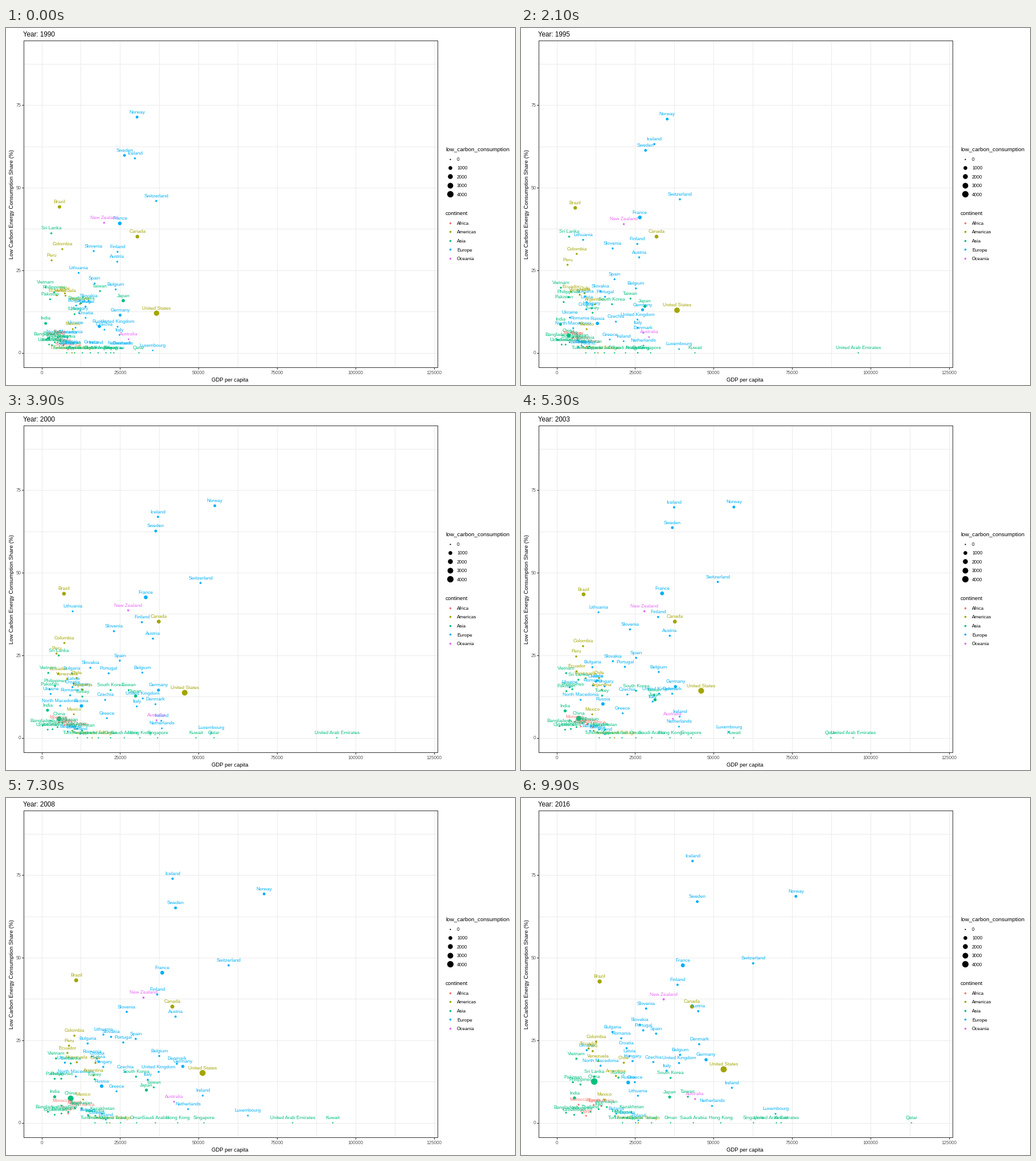
These frames come from a looping animation (894x626 px, 10 s). A matplotlib script:

```python
import numpy as np
import matplotlib.pyplot as plt
from matplotlib.animation import FuncAnimation
from matplotlib.patches import Rectangle

W, H, DPI = 894, 626, 64
PX = 72 / DPI                      # points per pixel
FRAMES, INTERVAL = 100, 100
LEFT, RIGHT, TOP, BOTTOM = 30.5, 757.5, 21.5, 594.5
GDP_MAX = 120                      # thousands; richer countries are dropped

plt.rcParams["font.family"] = "Liberation Sans"
plt.rcParams["text.hinting"] = "default"
rng = np.random.default_rng(7)
fig = plt.figure(figsize=(W / DPI, H / DPI), dpi=DPI, facecolor="white")
ax = fig.add_axes([0, 0, 1, 1])
ax.set_xlim(0, W)
ax.set_ylim(H, 0)
ax.axis("off")


def px(gdp):
    return 62.5 + 5.516 * gdp


def py(share):
    return 569.5 - 5.788 * share


def diameter(twh):
    return 2.2 + 9 * np.sqrt(twh / 4000)


def line(x1, y1, x2, y2, color):
    ax.plot([x1, x2], [y1, y2], color=color, lw=PX, antialiased=False,
            solid_capstyle="butt", zorder=1)


def text(x, y, s, size, color="black", **kw):
    kw = {"ha": "left", "va": "baseline", "zorder": 5} | kw
    return ax.text(x, y, s, fontsize=size * PX, color=color, **kw)


def dots(x, y, d, color):
    return ax.scatter(x, y, s=(np.asarray(d) * PX) ** 2, c=color,
                      linewidths=0, zorder=3)


# Panel, grid and axes
for gdp in np.arange(0, 126, 12.5):
    line(px(gdp), TOP, px(gdp), BOTTOM, "#EBEBEB")
for share in np.arange(0, 90, 12.5):
    line(LEFT, py(share), RIGHT, py(share), "#EBEBEB")
for gdp in range(0, 126, 25):
    line(px(gdp), BOTTOM, px(gdp), BOTTOM + 3, "#333333")
    text(px(gdp), 607, str(gdp * 1000), 8, "#4D4D4D", ha="center")
for share in range(0, 76, 25):
    line(LEFT - 3, py(share), LEFT, py(share), "#333333")
    text(26.5, py(share) + 3, str(share), 8, "#4D4D4D", ha="right")
panel = Rectangle((LEFT, TOP), RIGHT - LEFT, BOTTOM - TOP, fill=False,
                  ec="#333333", lw=PX, antialiased=False, zorder=6)
ax.add_patch(panel)
text(393, 620, "GDP per capita", 9.5, ha="center")
text(11, 309, "Low Carbon Energy Consumption Share (%)", 9.8,
     ha="center", va="center", rotation=90)
title = text(30, 15, "", 11.7)

# Legends
COLORS = {"Africa": "#F8766D", "Americas": "#A3A500", "Asia": "#00BF7D",
          "Europe": "#00B0F6", "Oceania": "#E76BF3"}
text(772, 216, "low_carbon_consumption", 9.9)
text(772, 328, "continent", 9.7)
for i, (name, color) in enumerate(COLORS.items()):
    y = 229.5 + 15.4 * i
    dots([780], [y], [diameter(1000 * i)], "black")
    text(792, y + 3.5, str(1000 * i), 8.2)
    y = 341.5 + 15.5 * i
    dots([780], [y], [3.6], color)
    text(792, y + 3.5, name, 8.2)

# Low carbon consumption in TWh, first and last year
MAJOR = {"United States": (2500, 3700), "China": (350, 4200),
         "Brazil": (700, 1300), "Canada": (900, 1200), "France": (900, 1100),
         "Russia": (600, 900), "Japan": (650, 400), "Germany": (400, 600),
         "India": (350, 550), "Norway": (350, 380), "Sweden": (350, 370)}
countries = []


def add(continent, name, gdp, share, growth, slump=0):
    label = text(0, 0, name, 8.4, COLORS[continent], ha="center", clip_on=True)
    label.set_clip_path(panel)
    twh = MAJOR.get(name, (12 * share[0] ** 0.5, 25 * share[-1] ** 0.5))
    countries.append((label, gdp, share, twh, growth, slump))


def along(values, s):
    """Evenly spaced key values, joined by straight lines."""
    return np.interp(s, np.linspace(0, 1, len(values)), values)


def steady(s):
    return s


def boom(s):
    """Slow start, a jump before 2000, then a level stretch."""
    return np.interp(s, (0, 0.21, 0.39, 0.53, 0.73, 1), (0, 0.1, 0.54, 0.56, 0.88, 1))


def group(continent, growth=steady, slump=0, **ends):
    """Each country: first GDP and share, last GDP and share."""
    for name, (g0, s0, g1, s1) in ends.items():
        add(continent, name.replace("_", " "), (g0, g1), (s0, s1), growth, slump)


def ladder(continent, names, first, last, shares=(0, 0), slump=0):
    """Countries near the bottom, one step of GDP apart."""
    for name, g0, g1 in zip(names, first, last):
        add(continent, name, (g0, g1), rng.uniform(*shares, 2), steady, slump)


steps = np.arange(10)
group("Europe", boom,
      Norway=(30.4, 71.4, 76.2, 68.6), Sweden=(26.4, 59.8, 44.8, 67),
      Iceland=(29.7, 58.9, 43.3, 79.3), Switzerland=(36.5, 46, 62.6, 48.3),
      France=(24.9, 39.2, 40.2, 47.7), Finland=(24.2, 30.6, 38.5, 41.8),
      Austria=(24.1, 27.6, 45.1, 33.8), Germany=(25, 11.4, 47.6, 19.1),
      United_Kingdom=(24.2, 7.9, 39, 18.1), Belgium=(23.6, 19.2, 39.3, 20.6),
      Spain=(16.9, 21, 31.7, 27), Italy=(24.8, 5.4, 35, 15.8),
      Denmark=(25.5, 1.3, 45.4, 23.8), Ireland=(17.3, 1.6, 55.8, 10.6),
      Netherlands=(25.1, 1.4, 49.5, 5.1), Luxembourg=(35.4, 0.7, 69.7, 2.7),
      Portugal=(14, 14, 27.6, 28), Greece=(16, 1.8, 24.9, 12.3),
      Slovenia=(16.6, 30.8, 28.5, 34.6))
group("Europe", slump=7,
      Slovakia=(15, 15.7, 26.5, 29.7), Bulgaria=(11, 14.3, 17.8, 27.5),
      Hungary=(12, 12, 24.2, 18.7), Czechia=(20, 7, 30.8, 18.4),
      Romania=(8.2, 4.6, 20.6, 25.6), North_Macedonia=(7.3, 4.8, 14, 17.3))
group("Europe", slump=13,
      Russia=(18.4, 8, 22.8, 12.2), Ukraine=(10.8, 7.6, 9.6, 22),
      Latvia=(14, 14, 23.2, 20.2), Croatia=(14, 10.6, 22.3, 22.6))
group("Oceania", boom,
      Australia=(27.7, 4.1, 44.1, 7.2), New_Zealand=(19.9, 39.4, 34.1, 37.4))
group("Americas", boom,
      Canada=(30.5, 35.2, 43.1, 35.2), United_States=(36.6, 12, 53.2, 16.2))
group("Americas", slump=3,
      Brazil=(5.7, 44.2, 13.7, 42.8), Colombia=(6.6, 31.4, 12.6, 24.6),
      Peru=(3.2, 28, 11.5, 21.7), Chile=(7.4, 18, 21.4, 18.2),
      Ecuador=(4.9, 17.4, 10.2, 22.5), Venezuela=(7.6, 17.3, 13.3, 18.7),
      Argentina=(12.2, 14.8, 18.9, 14.2), Mexico=(9.9, 7.2, 15.2, 7))
group("Asia",
      Japan=(26, 15.8, 36, 7.8), South_Korea=(12.6, 15, 36.3, 13.6),
      Taiwan=(18.6, 18.7, 41.8, 7.9))
group("Asia", slump=2,
      Vietnam=(1.3, 19.8, 6.3, 19.4), Philippines=(4, 18.3, 7.6, 11.6),
      Pakistan=(2.7, 16.2, 5.2, 12.3), Turkey=(10.5, 11.7, 19.7, 13.7),
      India=(1.3, 8.9, 5.7, 7.5))

# Countries with a sharp turn
add("Europe", "Lithuania", (11.8, 25.9), (24.2, 36, 40, 26, 8.2), steady, 13)
add("Asia", "Sri Lanka", (3.1, 12), (36.2, 35, 17.5, 18, 14), steady, 2)
add("Asia", "China", (2.3, 12), (4.4, 5.7, 6, 12.5), steady, 1)
add("Asia", "Kuwait", (22, 48, 50, 95, 71.5), (0, 0), steady)
add("Asia", "Qatar", (31, 25, 77, 150, 113), (0, 0), steady)
add("Asia", "United Arab Emirates", (130, 90, 97, 79, 70), (0, 0), steady)

ladder("Africa", ["Morocco", "Egypt", "Algeria", "South Africa"],
       4.5 + 1.3 * steps, 7 + 2.4 * steps, (1, 6))
ladder("Asia", ["Bangladesh", "Uzbekistan", "Indonesia", "Thailand", "Iraq",
                "Azerbaijan", "Iran", "Malaysia", "Kazakhstan"],
       1.5 + 0.9 * steps, 3 + 2.6 * steps, (1.5, 4.8), 3)
ladder("Europe", ["Belarus", "Estonia", "Poland"],
       8 + steps, 19 + 3.5 * steps, (0, 3), 7)
ladder("Americas", ["Trinidad and Tobago"], [9.7], [26])
ladder("Asia", ["Turkmenistan", "Cyprus", "Israel", "Oman", "Saudi Arabia",
                "Hong Kong", "Singapore"],
       8 + 2.5 * steps, 21 * 1.2 ** steps, slump=3)

labels = [c[0] for c in countries]
n = len(countries)
points = dots(np.zeros(n), np.zeros(n), np.zeros(n), [t.get_color() for t in labels])
points.set_clip_path(panel)


def year_at(i):
    """Four frames per year, three for the last five years."""
    return 1990 + i / 4 if i <= 84 else 2011 + (i - 84) / 3


def draw(i):
    s = i / (FRAMES - 1)
    dip = np.sin(np.pi * s) * (1 - s)
    title.set_text(f"Year: {round(year_at(i))}")
    spots, sizes = [], []
    for label, gdps, shares, twh, growth, slump in countries:
        gdp = along(gdps, growth(s)) - slump * dip
        x, y = px(gdp), py(along(shares, s))
        shown = gdp <= GDP_MAX
        label.set_position((x, y - 6.5))
        label.set_visible(shown)
        spots.append((x, y))
        sizes.append((diameter(along(twh, s)) * PX) ** 2 * shown)
    points.set_offsets(spots)
    points.set_sizes(sizes)
    return [title, points, *labels]


anim = FuncAnimation(fig, draw, frames=FRAMES, init_func=lambda: draw(0),
                     interval=INTERVAL, repeat=True, repeat_delay=0)
plt.show()
```
